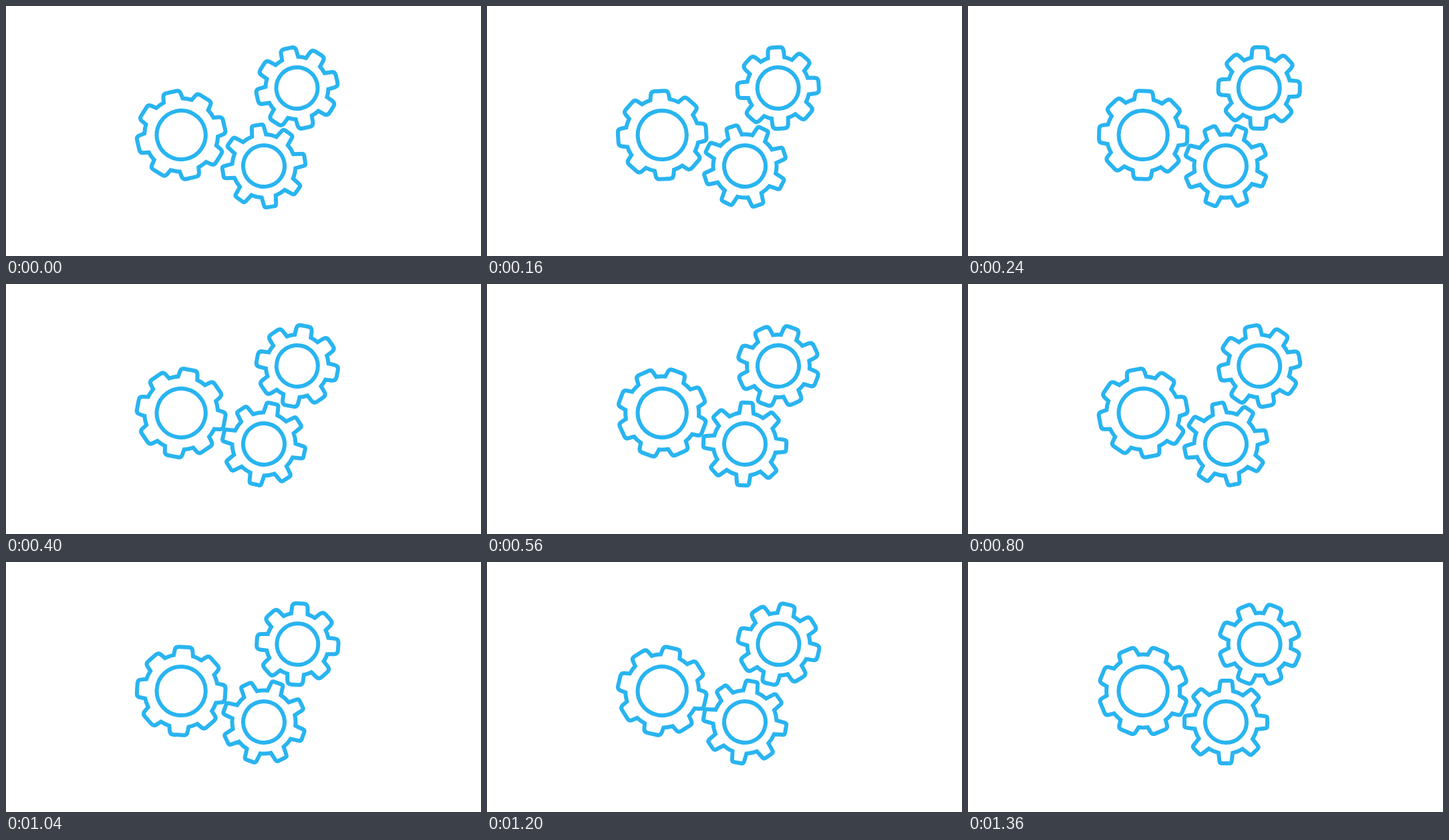
Recreate the animation shown at these times as an HTML page. Size 711 px wide and 375 px high, loop 1.44 s.

```html
<!DOCTYPE html>
<html lang="en">
<head>
<meta charset="utf-8">
<title>Turning gears</title>
<style>
  html, body { margin: 0; width: 100%; height: 100%; overflow: hidden; background: #fff; }
  svg { display: block; width: 711px; height: 375px; }
  svg path, svg circle { fill: none; stroke: #29b4f0; stroke-width: 6; }
</style>
</head>
<body>
<svg viewBox="0 0 711 375"></svg>
<script>
const NS = 'http://www.w3.org/2000/svg';
const TEETH = 8, STEP = 80, LOOP = 1440, TURN = 90 / 19;

// hole: ring radius, root/tip: radii of the outline, base: half angle of a tooth,
// half: half width at the tip, round: corner radius, dx/dy: hub offset from the pivot
const gears = [
  { x: 262.2, y: 193.5, hole: 36.6, root: 55, tip: 66, base: 15.3, half: 12.6, round: 5, start: -13, dir: 1, dx: 0, dy: 0 },
  { x: 435.8, y: 123.8, hole: 31, root: 47, tip: 61, base: 15.2, half: 11.4, round: 6, start: -13, dir: 1, dx: -0.3, dy: -0.8 },
  { x: 386, y: 240, hole: 31, root: 47.5, tip: 62, base: 12.9, half: 8.7, round: 3.2, start: -9, dir: -1, dx: 0, dy: 0 }
];

function outline(g) {
  const rad = Math.PI / 180;
  const bx = g.root * Math.cos(g.base * rad), by = g.root * Math.sin(g.base * rad);
  const len = Math.hypot(g.tip - bx, g.half - by);
  const sx = g.tip - (g.tip - bx) / len * g.round;
  const sy = g.half - (g.half - by) / len * g.round;
  const flat = g.half - g.round;
  let d = '';
  for (let i = 0; i < TEETH; i++) {
    const a = i * 360 / TEETH * rad, c = Math.cos(a), s = Math.sin(a);
    const at = (x, y) => (x * c - y * s).toFixed(2) + ' ' + (x * s + y * c).toFixed(2);
    d += (i ? `A${g.root} ${g.root} 0 0 1 ` : 'M') + at(bx, -by)
      + 'L' + at(sx, -sy) + 'Q' + at(g.tip, -g.half) + ' ' + at(g.tip, -flat)
      + 'L' + at(g.tip, flat) + 'Q' + at(g.tip, g.half) + ' ' + at(sx, sy)
      + 'L' + at(bx, by);
  }
  return d + `A${g.root} ${g.root} 0 0 1 ${bx.toFixed(2)} ${(-by).toFixed(2)}Z`;
}

function add(parent, tag, attrs = {}) {
  const el = parent.appendChild(document.createElementNS(NS, tag));
  for (const key in attrs) el.setAttribute(key, attrs[key]);
  return el;
}

const svg = document.querySelector('svg');
for (const g of gears) {
  g.el = add(svg, 'g');
  add(g.el, 'path', { d: outline(g) });
  add(g.el, 'circle', { r: g.hole });
}

function draw(ms) {
  const step = Math.floor(ms % LOOP / STEP);
  for (const g of gears) {
    const turn = g.dir * step * TURN;
    g.el.setAttribute('transform',
      `translate(${g.x} ${g.y}) rotate(${turn}) translate(${g.dx} ${g.dy}) rotate(${g.start})`);
  }
}

const begin = performance.now();
function tick() {
  draw(performance.now() - begin);
  requestAnimationFrame(tick);
}
tick();
</script>
</body>
</html>
```
